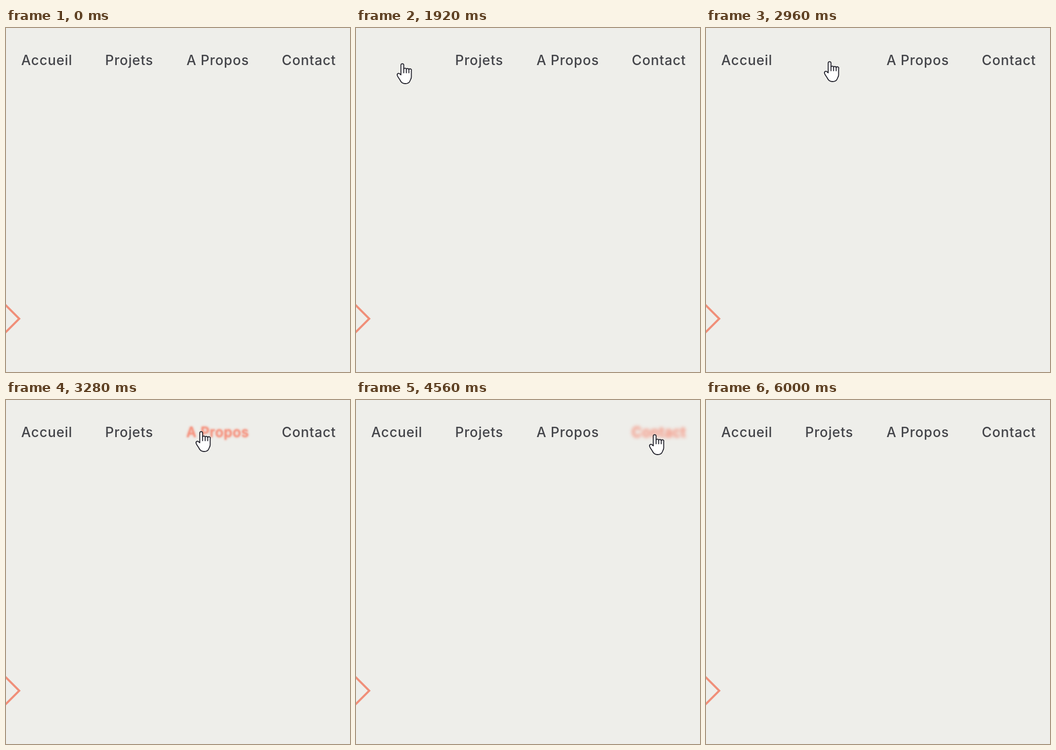
Write an HTML page that moves like this. It is 668 px wide and 668 px high and loops after 6480 ms.

```html
<!DOCTYPE html>
<html lang="fr">
<head>
<meta charset="utf-8">
<title>Menu</title>
<style>
  html, body { margin: 0; width: 100%; height: 100%; overflow: hidden; background: #eeeeea; }
  svg { display: block; width: 100vw; height: 100vh; }
  text { font: 500 26.4px Inter, sans-serif; letter-spacing: .85px; fill: #434449; }
  .hover { fill: #f68b76; }
  .chevron { fill: none; stroke: #f08f79; stroke-width: 4; }
  .cursor path { fill: #fff; stroke: #20202a; stroke-width: 1.8; stroke-linejoin: round; stroke-linecap: round; }
</style>
</head>
<body>
<svg viewBox="0 0 668 668">
  <polyline class="chevron" points="-6,532.8 25.7,564.5 -6,596.2"/>
  <g id="menu"></g>
  <g class="cursor" id="arrow"><path d="M0 0V27L6.5 21.5L10.8 31L15 29.2L11 20H19Z"/></g>
  <g class="cursor" id="hand">
    <path d="M-2.7 22V3a2.7 2.7 0 0 1 5.4 0V10.5a2.7 2.3 0 0 1 5 .3a2.7 2.3 0 0 1 5 1a2.5 2.3 0 0 1 4.8 2V26C17.5 30 15.5 31 14.7 34C13.5 37 10 39 5.5 39C0 39 -2.5 36 -4 33C-6 29 -10 25 -10 22C-10 19 -6 18 -4.5 20.5Z"/>
    <path d="M2.7 10.5V18M7.7 10.8V18M12.7 11.8V18"/>
  </g>
</svg>
<script>
const LOOP = 6480, STEP = 80, FADE = 400;

// label, x, hover start, hover end
const items = [
  ['Accueil', 29.5, 960, 2000],
  ['Projets', 192.5, 2080, 3040],
  ['A Propos', 350.5, 3120, 4320],
  ['Contact', 535.5, 4320, 5680]
];

// time, shape, x, y
const moves = [
  [0, ''],
  [880, 'arrow', 6, 111], [960, 'hand', 41, 76], [1040, 'hand', 50, 69], [1120, 'hand', 53, 67.5],
  [1920, 'hand', 90, 69], [2000, 'arrow', 150, 69], [2080, 'hand', 190, 67], [2160, 'hand', 200, 65], [2240, 'hand', 204, 64.5],
  [2960, 'hand', 240, 65], [3040, 'arrow', 320, 64], [3120, 'hand', 362, 62], [3200, 'hand', 376, 61], [3280, 'hand', 379, 61],
  [4240, 'arrow', 475.5, 64.5], [4320, 'hand', 546, 67], [4400, 'hand', 572, 67], [4480, 'hand', 580, 67],
  [5280, 'hand', 581, 69], [5600, 'arrow', 107, 176],
  [5680, '']
];

const menu = document.getElementById('menu');
const cursors = ['arrow', 'hand'].map(id => document.getElementById(id));

const words = items.map(([label, x]) => {
  const el = document.createElementNS('http://www.w3.org/2000/svg', 'text');
  el.setAttribute('x', x);
  el.setAttribute('y', 72);
  el.textContent = label;
  return menu.appendChild(el);
});

function drawWord(el, [, , start, end], t) {
  const hover = t >= start && t < end;
  const p = hover ? Math.min(1, (t - start) / FADE) : 0;
  el.setAttribute('class', hover ? 'hover' : '');
  el.style.opacity = 1 - p ** 3;
  el.style.filter = p ? `blur(${9 * p * p}px) drop-shadow(0 0 2px #f68b76)` : 'none';
}

function drawCursor(t) {
  const [, shape, x, y] = moves.findLast(m => m[0] <= t);
  for (const el of cursors) {
    const on = el.id === shape;
    el.style.display = on ? '' : 'none';
    if (on) el.setAttribute('transform', `translate(${x} ${y})`);
  }
}

function draw() {
  const t = Math.floor(performance.now() % LOOP / STEP) * STEP;
  words.forEach((el, i) => drawWord(el, items[i], t));
  drawCursor(t);
  requestAnimationFrame(draw);
}
draw();
</script>
</body>
</html>
```
